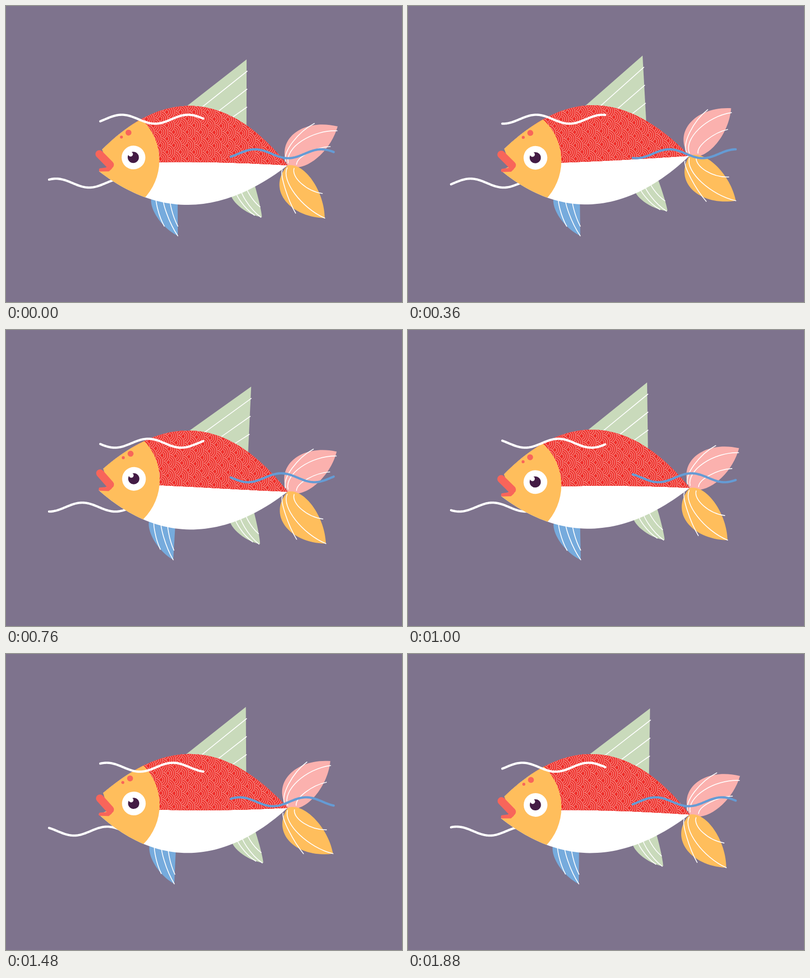
Write an HTML page with a canvas that moves like this. It is 800 px wide and 600 px high and loops after 1920 ms.

```html
<!DOCTYPE html>
<html lang="en">
<head>
<meta charset="utf-8">
<title>Swimming fish</title>
<style>
  html, body { margin: 0; width: 100%; height: 100%; overflow: hidden; background: #7e738d; }
  canvas { display: block; }
</style>
</head>
<body>
<canvas id="stage" width="800" height="600"></canvas>
<script>
const ctx = document.getElementById('stage').getContext('2d');
const LOOP = 1920, SWIM = 960, STEP = 40, TAU = Math.PI * 2;
const WATER = '#7e738d', WHITE = '#fff', ORANGE = '#ffbe5c', GREEN = '#c9dabb';
const BLUE = '#76abdd', PINK = '#fbb1ae', CORAL = '#f8655a', RED = '#ee2e2a';

const PIVOT = [343, 320], TAIL = [569, 316];
const BACK = [[195, 287], [322, 168], [445, 172], TAIL];
const BELLY = [TAIL, [430, 434], [300, 425], [187.6, 331]];

let now = 0;

const wave = (delay, size) => size * Math.sin(TAU * (now - delay) / SWIM);

// The swimming bend travels from head to tail
const bend = x => wave((x - 360) * 0.44, 0.055);

function warp([x, y], at = x) {
  const a = bend(at), c = Math.cos(a), s = Math.sin(a);
  const dx = x - PIVOT[0], dy = y - PIVOT[1];
  return [PIVOT[0] + dx * c + dy * s, PIVOT[1] - dx * s + dy * c];
}

// Cubic from a to b, bulging sideways by a share of its length
function bow(a, b, bulge = 0) {
  const dx = b[0] - a[0], dy = b[1] - a[1];
  const at = u => [a[0] + dx * u - dy * bulge, a[1] + dy * u + dx * bulge];
  return [a, at(0.1), at(0.65), b];
}

function shape(...cubics) {
  const path = new Path2D();
  for (const [a, b, c, d] of cubics) {
    path.lineTo(...a);
    path.bezierCurveTo(...b, ...c, ...d);
  }
  return path;
}

function polyline(points) {
  const path = new Path2D();
  points.forEach(p => path.lineTo(...p));
  return path;
}

// Points along a cubic, bent with the body
function bent([a, b, c, d], count = 50) {
  return Array.from({ length: count + 1 }, (_, i) => {
    const t = i / count, s = 1 - t;
    return warp([0, 1].map(k =>
      s * s * s * a[k] + 3 * s * s * t * b[k] + 3 * s * t * t * c[k] + t * t * t * d[k]));
  });
}

function fill(path, color) {
  ctx.fillStyle = color;
  ctx.fill(path);
}

function stroke(path, color, width) {
  ctx.strokeStyle = color;
  ctx.lineWidth = width;
  ctx.stroke(path);
}

function circle(x, y, r) {
  const path = new Path2D();
  path.arc(x, y, r, 0, TAU);
  return path;
}

const dot = (x, y, r, color) => fill(circle(x, y, r), color);
const rib = (a, b, bulge) => stroke(shape(bow(a, b, bulge)), WHITE, 1.7);

// Draws in the frame of a stiff part, turned anticlockwise around a point
function turned([x, y], angle, draw) {
  ctx.save();
  ctx.translate(x, y);
  ctx.rotate(-angle);
  draw();
  ctx.restore();
}

// A stiff part follows the bend at one place of the body
function stiff(at, draw) {
  turned(PIVOT, bend(at), () => {
    ctx.translate(-PIVOT[0], -PIVOT[1]);
    draw();
  });
}

function whisker(from, to, y, crest, color) {
  const points = [], shift = crest + 134 * now / LOOP;
  for (let x = from; x <= to; x += 2) {
    points.push([x, y - 9 * Math.cos(TAU * (x - shift) / 134)]);
  }
  stroke(polyline(points), color, 4.6);
}

function leaf(color, tip, left, right) {
  fill(shape(bow([0, 0], tip, left), bow([0, 0], tip, right)), color);
}

function tailFins() {
  leaf(PINK, [101, -79], -0.445, 0.26);
  rib([-4, -8], [54, -85], -0.17);
  rib([1, -5], [100, -70], -0.25);
  rib([18, -2], [86, -38], -0.17);

  leaf(ORANGE, [75, 107], 0.46, -0.24);
  rib([-11, 9], [16, 97], 0.08);
  rib([-1, 5], [75, 107], 0.2);
  rib([13, 6], [70, 57], 0.23);
}

function dorsalFin() {
  fill(polyline([[340, 222], [483.8, 106.8], [485.2, 262]]), GREEN);
  for (let i = 0; i < 3; i++) {
    rib([485.3, 130.5 + 36.5 * i], [385 + 31.5 * i, 212.5 + 9 * i]);
  }
}

function bellyFin() {
  const tip = [344.5, 466];
  fill(shape(bow([296, 380], tip, 0.23), bow(tip, [345.5, 390])), BLUE);
  [[317.5, 446], tip, [345, 446.5]].forEach((end, i) => rib([303 + 14 * i, 385], end, 0.09));
}

function rearFin() {
  const tip = [519, 424.6];
  fill(shape(bow([455, 372], tip, 0.21), bow(tip, [500, 350], 0.03)), GREEN);
  [[504, 421], [517, 424.7], [515, 403.7]].forEach((end, i) =>
    rib([465 + 10.5 * i, 368 - 5 * i], end, 0.13));
}

// Overlapping ringed discs, laid from the tail towards the head
function scales() {
  for (let col = 22; col >= 0; col--) {
    for (let row = 0; row < 6; row++) {
      const [x, y] = warp([270 + col * 13.5, 188 + (row + col % 2 / 2) * 27]);
      dot(x, y, 18, RED);
      for (let r = 16.6; r > 2; r -= 3.8) stroke(circle(x, y, r), '#f6938c', 1.3);
    }
  }
}

function body() {
  const back = bent(BACK);
  const outline = polyline([...back, ...bent(BELLY), warp([207, 322])]);
  fill(outline, WHITE);

  ctx.save();
  ctx.clip(polyline([...back, ...bent(bow(TAIL, [195, 316.5]))]));
  fill(outline, RED);
  scales();
  ctx.restore();

  ctx.save();
  ctx.clip(outline);
  dot(...warp([196.5, 310], 250), 113.5, ORANGE);
  ctx.restore();
}

function face() {
  const jaw = new Path2D('M190 328.5L203 327L212 321V326L207 330.5H190Z');
  stroke(polyline([[189, 297.4], [210, 319.4]]), CORAL, 16);
  fill(jaw, CORAL);
  stroke(jaw, CORAL, 4.5);
  dot(248.6, 255, 6, CORAL);
  dot(234.2, 263.7, 3, CORAL);
  dot(257.8, 305.6, 24, WHITE);
  dot(257.4, 305.4, 11.3, '#431b44');
  dot(252, 298.8, 4.8, WHITE);
}

function draw(time) {
  now = Math.floor(time % LOOP / STEP) * STEP;
  ctx.fillStyle = WATER;
  ctx.fillRect(0, 0, 800, 600);
  ctx.lineCap = ctx.lineJoin = 'round';
  whisker(87, 252, 359, 101, WHITE);
  turned(warp(TAIL), 0.092 + wave(168, 0.103), tailFins);
  stiff(428, dorsalFin);
  stiff(246, bellyFin);
  stiff(492, rearFin);
  body();
  stiff(246, face);
  whisker(190.5, 400, 229.5, 234, WHITE);
  whisker(454, 662, 299.5, 503, '#659bd4');
}

const start = performance.now();
function tick() {
  draw(performance.now() - start);
  requestAnimationFrame(tick);
}
tick();
</script>
</body>
</html>
```
